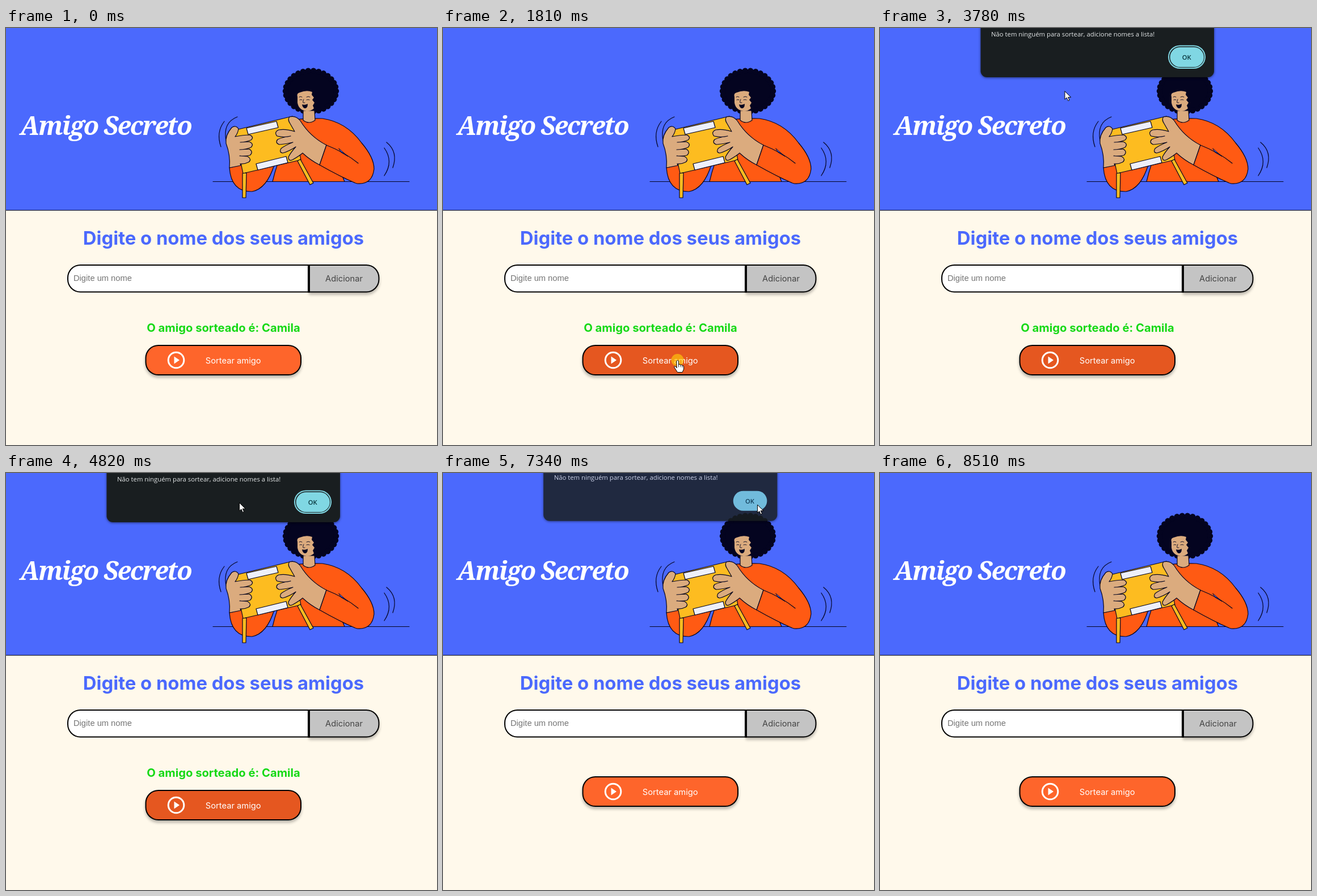
Animation of 760 by 737 pixels, one loop 9450 ms. Source, as an HTML page with a canvas:

```html
<!DOCTYPE html>
<html lang="pt-BR">
<head>
<meta charset="utf-8">
<title>Amigo Secreto</title>
<style>
html, body { margin: 0; width: 100%; height: 100%; overflow: hidden; background: #fff9eb; }
canvas { display: block; }
</style>
</head>
<body>
<canvas id="stage" width="760" height="737"></canvas>
<script>
const page = document.getElementById('stage').getContext('2d');
const layer = Object.assign(document.createElement('canvas'), { width: 760, height: 110 });
const overlay = layer.getContext('2d');
let ctx = page;

const LOOP = 9450;
const BLUE = '#4b69fd', CREAM = '#fff9eb', ORANGE = '#ff5a13', YELLOW = '#fdbc20',
      SKIN = '#dbab7e', NAVY = '#040420', PAPER = '#eef0fa';
const INTER = 'Inter, Roboto, sans-serif';

// Cursor moves: start, end, number of steps, way points, easing
const linear = u => u;
const easeOut = u => 1 - (1 - u) ** 2;
const smooth = u => u * u * (3 - 2 * u);
const MOVES = [
  [260, 1020, 11, [[586, 745], [413.5, 587]], easeOut],
  [3090, 3370, 5, [[413.5, 587], [355, 201]], smooth],
  [3570, 4470, 13, [[355, 201], [313, 76], [297, 46], [320, 52]], linear],
  [4540, 5310, 12, [[320, 52], [562, 53]], smooth],
  [5580, 5650, 2, [[562, 53], [555, 55]], linear],
  [5920, 5920, 1, [[555, 55], [554, 56]], linear],
  [7750, 8510, 12, [[554, 56], [580, 250], [625, 450], [752, 790]], linear]
];

function stepped(t, a, b, n) {
  if (t >= b) return 1;
  return (Math.floor((t - a) / (b - a) * (n - 1) + 1e-6) + 1) / n;
}

function spline(pts, u) {
  const last = pts.length - 1;
  const i = Math.min(Math.floor(u * last), last - 1), f = u * last - i;
  if (last === 1) return pts[0].map((v, k) => v + (pts[1][k] - v) * f);
  const at = j => pts[Math.max(0, Math.min(last, j))];
  return [0, 1].map(k => {
    const a = at(i - 1)[k], b = at(i)[k], c = at(i + 1)[k], d = at(i + 2)[k];
    return b + f / 2 * (c - a + f * (2 * a - 5 * b + 4 * c - d + f * (3 * (b - c) + d - a)));
  });
}

function cursorAt(t) {
  if (t < 260 || t >= 8510) return null;
  const [a, b, n, pts, ease] = MOVES.filter(m => t >= m[0]).pop();
  return spline(pts, ease(stepped(t, a, b, n)));
}

const inside = (p, x, y, w, h) =>
  !!p && p[0] >= x && p[0] <= x + w && p[1] >= y && p[1] <= y + h;

function shape(d, fill, stroke, width = 1.2) {
  const path = new Path2D(d);
  if (fill) { ctx.fillStyle = fill; ctx.fill(path); }
  if (stroke) { ctx.strokeStyle = stroke; ctx.lineWidth = width; ctx.stroke(path); }
}

function label(str, x, y, font, color, align = 'center') {
  ctx.font = font;
  ctx.fillStyle = color;
  ctx.textAlign = align;
  ctx.fillText(str, x, y);
}

function box(x, y, w, h, r, fill) {
  ctx.beginPath();
  ctx.roundRect(x, y, w, h, r);
  ctx.fillStyle = fill;
  ctx.fill();
}

function bordered(x, y, w, h, r, fill, shadow) {
  ctx.save();
  if (shadow) {
    ctx.shadowColor = 'rgba(0,0,0,.27)';
    ctx.shadowBlur = 5;
    ctx.shadowOffsetY = 4;
  }
  box(x, y, w, h, r, '#000');
  ctx.restore();
  box(x + 2, y + 2, w - 4, h - 4, r.map(v => Math.max(0, v - 2)), fill);
}

function disc(x, y, r, fill) {
  ctx.beginPath();
  ctx.arc(x, y, r, 0, 7);
  ctx.fillStyle = fill;
  ctx.fill();
}

function drawHead() {
  ctx.beginPath();
  ctx.ellipse(537.5, 111, 46, 37, 0, 0, 7);
  ctx.fillStyle = NAVY;
  ctx.fill();
  for (let i = 0; i < 30; i++) {
    const a = i * Math.PI / 15;
    disc(537.5 + 44.5 * Math.cos(a), 111.5 + 36 * Math.sin(a), 5.2, NAVY);
  }
  shape('M524 146V163Q534 171 545 163L544 146Z', SKIN, NAVY);
  shape('M514 122Q512 115 518 114Q530 109 540 113L539 118L543 123L540 127L544 132L541 137L543 142' +
        'Q538 147 530 147Q516 145 514 132Z', SKIN);
  shape('M517 122Q519 120 522 122M530 122Q533 120 536 122M518 127Q520 126 522 127' +
        'M530 127Q533 126 535 127M525 126Q523 131 524 132H527', null, NAVY, .9);
  shape('M522 135Q527 137 532 134Q532 142 527 142Q523 141 522 135Z', NAVY);
}

function drawArt() {
  ctx.lineJoin = ctx.lineCap = 'round';
  shape('M365 271.5H711', null, NAVY);
  shape('M385 165Q370 184 379 210M408 157Q382 167 388 199' +
        'M671 202Q692 219 682 247M667 212Q684 236 667 261', null, NAVY);

  // Sweater, far sleeve and near arm
  shape('M500 163Q530 159 558 160Q600 166 627 203Q649 229 649 249Q646 277 619 275' +
        'L594 264L597 271.5H470Q477 240 490 215Z', ORANGE, NAVY);
  shape('M394 247L416 242L473 242Q460 284 434 289Q397 290 394 247Z', ORANGE, NAVY);
  drawHead();

  // Parcel with labels and ribbons
  shape('M402 181L505 156L520 233L418 257Z', YELLOW, NAVY);
  shape('M424 177L477 165L480 176L427 188ZM441 240L494 227L497 238L444 251Z', PAPER, NAVY);
  shape('M417 257L424 256L423 300H417ZM514 235L519 232L542 274L536 277Z', YELLOW, NAVY);

  shape('M394 247Q396 225 388 204Q386 190 398 176Q405 171 410 178Q409 186 404 192' +
        'Q418 189 430 189Q438 193 432 198Q422 202 413 202L429 201Q438 205 432 211' +
        'Q422 215 412 215L429 214Q437 219 430 225Q422 227 412 226L426 227' +
        'Q434 232 428 237Q420 241 413 240L414 243Z', SKIN, NAVY);
  shape('M565 207Q536 192 519 164Q511 154 500 157Q496 162 501 169L509 183' +
        'Q494 178 481 180Q472 184 478 191Q490 194 502 191Q487 193 479 197' +
        'Q474 203 482 206Q495 205 506 202Q493 207 485 213Q481 220 488 221' +
        'Q499 218 511 210Q502 220 498 228Q498 236 505 233Q516 227 523 221' +
        'Q537 234 553 242Z', SKIN, NAVY);

  const sleeve = 'M621 239Q598 220 565 207L553 242Q588 262 616 274';
  shape(sleeve + 'Q640 274 645 251Z', ORANGE);
  shape('M587 213L603 227L591 220Z', BLUE, NAVY, .8);
  shape(sleeve, null, NAVY);
}

function drawPage(showResult, drawHover, addHover) {
  ctx.fillStyle = CREAM;
  ctx.fillRect(0, 0, 760, 737);
  ctx.fillStyle = BLUE;
  ctx.fillRect(0, 0, 760, 322);
  ctx.fillStyle = '#000';
  ctx.fillRect(0, 321.7, 760, 1);

  ctx.letterSpacing = '-2px';
  label('Amigo Secreto', 25, 189, 'italic bold 45px "Noto Serif", serif', '#fff', 'left');
  ctx.letterSpacing = '0px';
  drawArt();

  label('Digite o nome dos seus amigos', 383.5, 383, 'bold 32.8px ' + INTER, BLUE);
  bordered(534, 418, 124.5, 49.5, [0, 23, 23, 0], addHover ? '#a1a1a1' : '#c4c4c4', true);
  bordered(108, 418, 427, 49.5, [23, 0, 0, 23], '#fff');
  ctx.fillStyle = '#000';
  ctx.fillRect(532, 418, 4, 49.5);
  label('Digite um nome', 119, 447, '14.7px "Liberation Sans", sans-serif', '#757575', 'left');
  label('Adicionar', 596, 448, '14.7px ' + INTER, '#444');

  if (showResult) label('O amigo sorteado é: Camila', 383.5, 537, 'bold 20.2px ' + INTER, '#16d916');

  ctx.save();
  if (!showResult) ctx.translate(0, -24);
  bordered(245.5, 560, 275.5, 54, [23, 23, 23, 23], drawHover ? '#e55720' : '#fe652b', true);
  ctx.beginPath();
  ctx.arc(300, 587, 13.8, 0, 7);
  ctx.strokeStyle = '#fff';
  ctx.lineWidth = 3;
  ctx.stroke();
  shape('M296.5 580.5V593.5L306 587Z', '#fff');
  label('Sortear amigo', 400.7, 593, '14.7px ' + INTER, '#fff');
  ctx.restore();
}

// Painted on its own layer so that it fades as one piece
function drawDialog(p, hover) {
  ctx = overlay;
  ctx.clearRect(0, 0, 760, 110);
  ctx.save();
  ctx.translate(383.5, -16 * (1 - p));
  ctx.scale(1 + .012 * (1 - p), 1 + .012 * (1 - p));
  ctx.translate(-383.5, 0);
  ctx.save();
  ctx.shadowColor = 'rgba(0,0,0,.55)';
  ctx.shadowBlur = 4;
  ctx.shadowOffsetY = 1;
  box(177.5, -40, 411.5, 127, 11, '#191e20');
  ctx.restore();
  const pill = hover ? '#78cad7' : '#80d7e3';
  if (p === 1) {
    box(508, 30.5, 66, 41.5, 21, pill);
    box(510, 32.5, 62, 37.5, 19, '#191e20');
  }
  box(511.5, 34, 59.5, 35, 18, pill);
  label('Não tem ninguém para sortear, adicione nomes a lista!', 196, 14.5,
        '11.3px "Open Sans", "Noto Sans", sans-serif', '#e3e6e7', 'left');
  label('OK', 540.7, 56, '600 11.2px "Open Sans", "Noto Sans", sans-serif', '#08363d');
  ctx.restore();

  ctx = page;
  ctx.globalAlpha = p;
  ctx.drawImage(layer, 0, 0);
  ctx.globalAlpha = 1;
}

function drawCursor([x, y], hand) {
  ctx.save();
  ctx.translate(x, y);
  if (hand) {
    shape('M-1.5 1.5Q0 -1 2 1.5V8Q4 6.5 5.5 8.5Q7.5 7.5 8.5 9.5Q11 9 11 12V16L8.5 21.5H0' +
          'L-5.5 13Q-6 9.5 -3.5 11L-1.5 13.5Z', '#fff', '#000', 1);
    shape('M2 8V12M5.5 9V12M8.5 10V12.5', null, '#000', .8);
  } else {
    shape('M.5 .5V14.5L3.8 11.6L6.2 17L8.6 16L6.2 10.8H10.8Z', '#fff', '#000', 1);
  }
  ctx.restore();
}

function dialogLevel(t) {
  if (t < 1950 || t >= 7550) return 0;
  if (t < 2080) return t < 2020 ? .3 : .75;
  if (t < 7340) return 1;
  return t < 7410 ? .85 : t < 7480 ? .45 : .14;
}

function render(t) {
  const tip = cursorAt(t);
  const before = t < 7340;
  const overDraw = t < 1810 ? inside(tip, 246, 560, 275, 54) : before;
  const overAdd = t > 7750 && inside(tip, 534, 418, 124, 49);
  const overOk = inside(tip, 511, 33, 61, 37);

  drawPage(before, overDraw, overAdd);
  const level = dialogLevel(t);
  if (level) drawDialog(level, overOk);
  if (!tip) return;
  for (const click of [1810, 7200]) {
    const age = t - click;
    if (age >= 0 && age < 140) disc(tip[0], tip[1], 11, `rgba(255,208,10,${age < 70 ? .62 : .4})`);
  }
  drawCursor(tip, t < 3570 && overDraw || overAdd);
}

const start = performance.now();
function tick() {
  render((performance.now() - start) % LOOP);
  requestAnimationFrame(tick);
}
tick();
</script>
</body>
</html>
```
